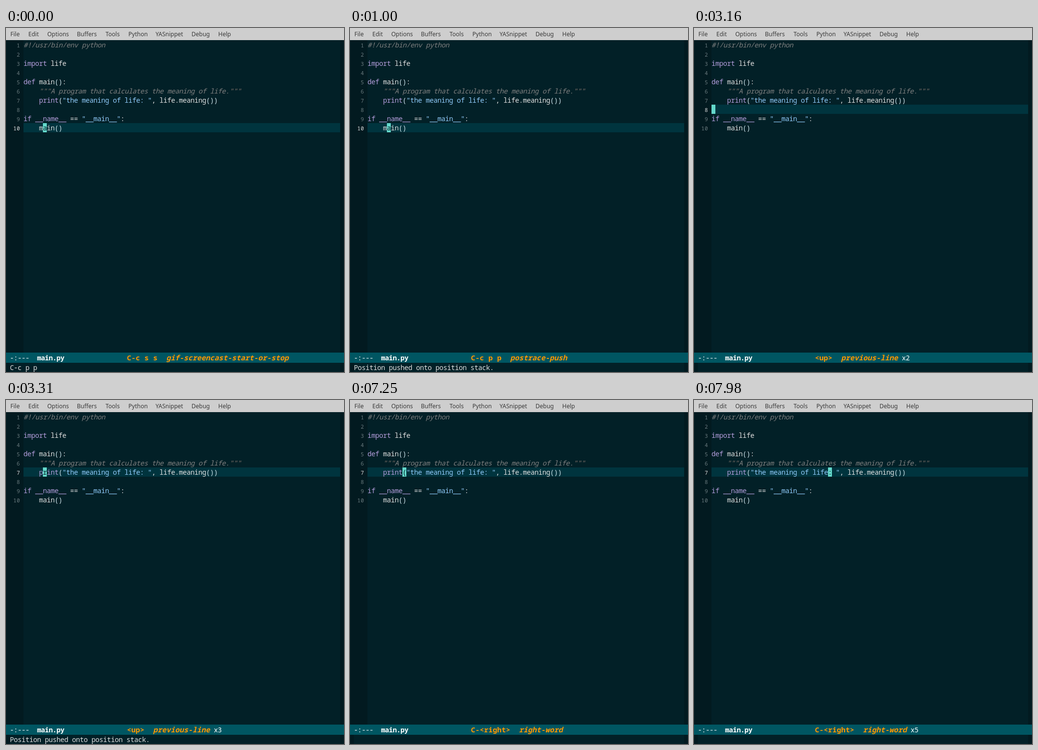
Animation of 696 by 709 pixels, one loop 8000 ms. Source, as an HTML page with a canvas:

```html
<!DOCTYPE html>
<html lang="en">
<head>
<meta charset="utf-8">
<title>Editor session</title>
<style>
html, body { margin: 0; width: 100%; height: 100%; overflow: hidden; background: #022027; }
canvas { display: block; width: 100vw; height: 100vh; }
</style>
</head>
<body>
<canvas id="stage" width="696" height="709"></canvas>
<script>
const ctx = document.getElementById('stage').getContext('2d', { alpha: false });

const LOOP = 8000;
const CELL = 8, ROW = 19, LEFT = 36, TOP = 25;
const MONO = '"Roboto Mono", "Noto Sans Mono", monospace';
const CODE = `14px ${MONO}`;
const ITALIC = `italic ${CODE}`;
const BOLD = `bold ${CODE}`;
const KEY = `bold 15px ${MONO}`;
const COMMAND = `italic ${KEY}`;

const color = {
  bg: '#022027', fringe: '#021a20', line: '#00343e', bar: '#005662',
  menu: '#cecece', menuText: '#3a3a3a',
  text: '#e0e0e0', keyword: '#b39ddb', string: '#90caf9', paren: '#cfe3ea',
  comment: '#808080', quote: '#7d6f68', number: '#6a7a7e',
  cursor: '#64d8cb', orange: '#ff9800', white: '#ffffff'
};

const menus = [
  ['File', 9], ['Edit', 46], ['Options', 85], ['Buffers', 146], ['Tools', 205],
  ['Python', 252], ['YASnippet', 308], ['Debug', 382], ['Help', 437]
];

// Each line is a list of [style, text] runs.
const source = [
  [['comment', '#!/usr/bin/env python']],
  [],
  [['keyword', 'import'], ['text', ' life']],
  [],
  [['keyword', 'def'], ['text', ' main'], ['paren', '()'], ['text', ':']],
  [['quote', '    """'], ['comment', 'A program that calculates the meaning of life.'], ['quote', '"""']],
  [['keyword', '    print'], ['paren', '('], ['string', '"the meaning of life: "'],
   ['text', ', life.meaning'], ['paren', '())']],
  [],
  [['keyword', 'if __name__'], ['text', ' == '], ['string', '"__main__"'], ['text', ':']],
  [['text', '    main'], ['paren', '()']]
];

const pushed = 'Position pushed onto position stack.';
const push = ['C-c p p', 'postrace-push'];
const up = ['<up>', 'previous-line'];
const right = ['C-<right>', 'right-word'];

// at: start in ms; row and col: cursor; count: repeats of the command.
const steps = [
  { at: 0, row: 10, col: 5, keys: ['C-c s s', 'gif-screencast-start-or-stop'], echo: 'C-c p p' },
  { at: 1000, row: 10, col: 5, keys: push, echo: pushed },
  { at: 2990, row: 9, col: 5, keys: up },
  { at: 3160, row: 8, col: 0, keys: up, count: 2 },
  { at: 3310, row: 7, col: 5, keys: up, count: 3, echo: pushed },
  { at: 6510, row: 7, col: 5, keys: push, echo: pushed },
  { at: 7250, row: 7, col: 9, keys: right },
  { at: 7410, row: 7, col: 14, keys: right, count: 2 },
  { at: 7590, row: 7, col: 22, keys: right, count: 3 },
  { at: 7780, row: 7, col: 25, keys: right, count: 4 },
  { at: 7980, row: 7, col: 30, keys: right, count: 5 }
];

function rect(fill, x, y, w, h) {
  ctx.fillStyle = fill;
  ctx.fillRect(x, y, w, h);
}

// Draws text on a fixed character grid and returns the x after it.
function grid(text, x, y, fill, font = CODE, cell = CELL) {
  ctx.font = font;
  ctx.fillStyle = fill;
  for (const ch of text) {
    ctx.fillText(ch, x, y);
    x += cell;
  }
  return x;
}

function drawMenu() {
  rect(color.menu, 0, 0, 696, TOP);
  ctx.font = '12px "Noto Sans", sans-serif';
  ctx.fillStyle = color.menuText;
  for (const [label, x] of menus) ctx.fillText(label, x, 17);
}

function drawCode({ row, col }) {
  rect(color.fringe, 0, TOP, LEFT, 644);
  rect(color.fringe, 688, TOP, 8, 644);
  rect(color.line, LEFT, TOP + (row - 1) * ROW, 652, ROW);

  source.forEach((runs, i) => {
    const top = TOP + i * ROW, base = top + 15;
    const current = i + 1 === row;
    const label = String(i + 1);
    grid(label, 29 - label.length * 7, base, current ? color.text : color.number, `11px ${MONO}`, 7);

    let x = LEFT;
    for (const [style, text] of runs) {
      const slanted = style === 'comment' || style === 'quote';
      x = grid(text, x, base, color[style], slanted ? ITALIC : CODE);
    }
    if (current) {
      const cx = LEFT + col * CELL;
      const line = runs.map(run => run[1]).join('');
      rect(color.cursor, cx, top, CELL, ROW);
      grid(line[col] || '', cx, base, color.bg);
    }
  });
}

function drawStatus({ keys, count, echo = '' }) {
  rect(color.bar, 0, 669, 696, 21);
  grid('-:---', 8, 685, color.white);
  grid('main.py', 64, 685, color.white, BOLD);
  let x = grid(keys[0], 249, 685, color.orange, KEY, 9);
  x = grid(keys[1], x + 18, 685, color.orange, COMMAND, 9);
  if (count) grid('x' + count, x + CELL, 685, color.white);

  rect(color.fringe, 0, 690, 8, 19);
  rect(color.fringe, 688, 690, 8, 19);
  grid(echo, 8, 705, color.text);
}

const start = performance.now();

function frame(now) {
  const t = Math.max(0, now - start) % LOOP;
  const step = steps.filter(s => s.at <= t).pop();
  rect(color.bg, 0, 0, 696, 709);
  drawMenu();
  drawCode(step);
  drawStatus(step);
  requestAnimationFrame(frame);
}
frame(start);
</script>
</body>
</html>
```
